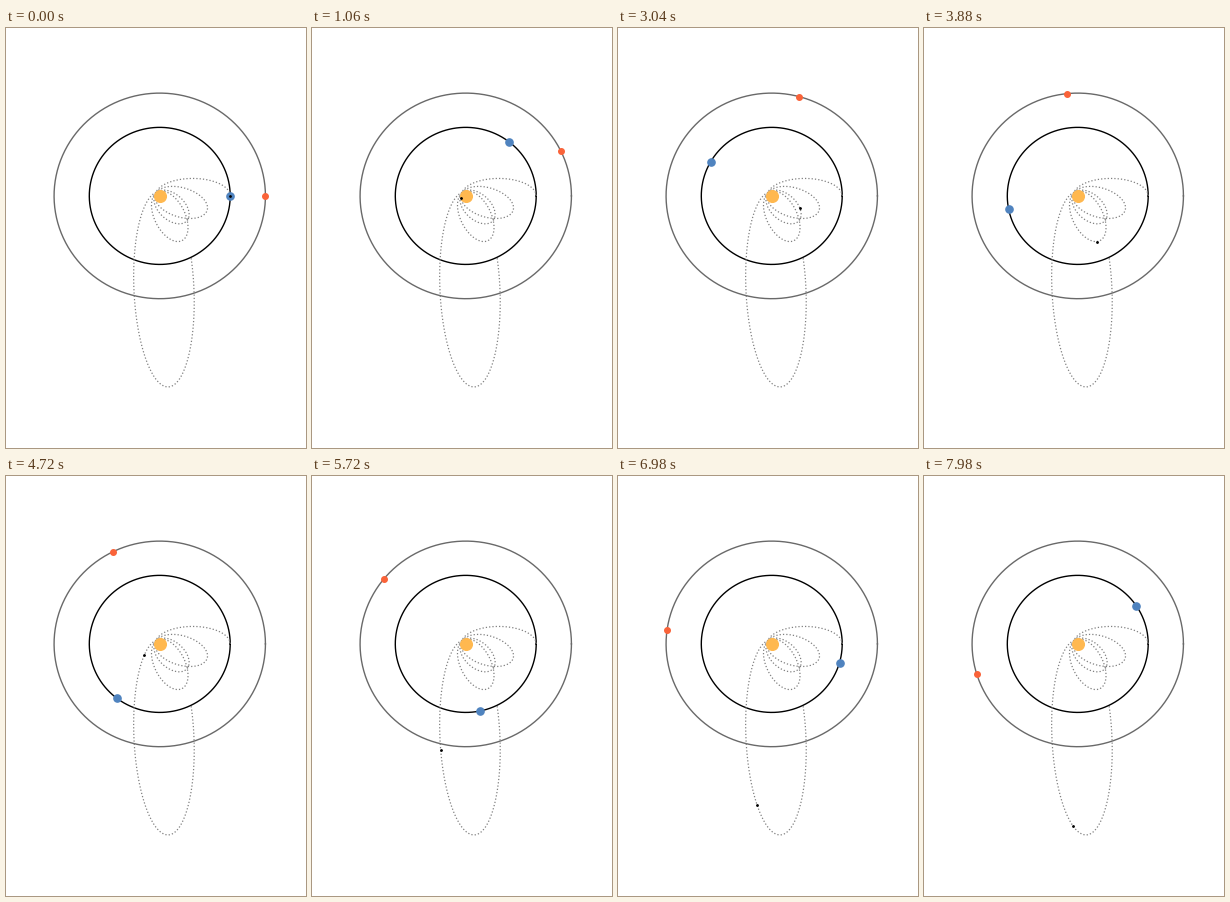
A matplotlib script for the animation above (8000 ms loop, 300 by 420 pixels).

```python
import numpy as np
import matplotlib.pyplot as plt
from matplotlib.animation import FuncAnimation

FRAMES, INTERVAL = 400, 20
YEAR = 365            # one frame is one day
PERIHELION = 0.065

# aphelion distance (AU), aphelion direction (deg), perihelion day, period (days)
LEGS = [
    (1.000, 0.0, -52.6, 105.2),
    (0.705, -17.4, 52.6, 64.7),
    (0.530, -44.0, 117.3, 46.4),
    (0.725, -64.5, 163.7, 68.37),
    (2.790, -87.5, 232.07, 454.3),
]
END_RADIUS = 1.0


def shape(leg):
    """Semi-major axis and eccentricity of a leg."""
    far = leg[0]
    return (far + PERIHELION) / 2, (far - PERIHELION) / (far + PERIHELION)


def locate(leg, ecc_anom):
    """Position in AU on a leg at the given eccentric anomaly."""
    a, e = shape(leg)
    along = a * (e - np.cos(ecc_anom))
    across = -a * np.sqrt(1 - e * e) * np.sin(ecc_anom)
    w = np.radians(leg[1])
    return (along * np.cos(w) - across * np.sin(w),
            along * np.sin(w) + across * np.cos(w))


def solve_kepler(mean, e):
    lo, hi = 0.0, 2 * np.pi
    for _ in range(40):
        mid = (lo + hi) / 2
        if mid - e * np.sin(mid) < mean:
            lo = mid
        else:
            hi = mid
    return (lo + hi) / 2


def probe_at(day):
    leg = [item for item in LEGS if item[2] <= day][-1]
    mean = 2 * np.pi * (day - leg[2]) / leg[3]
    return locate(leg, solve_kepler(mean, shape(leg)[1]))


def flight_path():
    xs, ys = [], []
    for i, leg in enumerate(LEGS):
        start = np.pi if i == 0 else 0.0
        stop = 2 * np.pi
        if i == len(LEGS) - 1:
            a, e = shape(leg)
            stop -= np.arccos((1 - END_RADIUS / a) / e)
        x, y = locate(leg, np.linspace(start, stop, 200))
        xs.append(x)
        ys.append(y)
    return np.concatenate(xs), np.concatenate(ys)


def planet_at(day, radius, period):
    angle = 2 * np.pi * day / period
    return radius * np.cos(angle), radius * np.sin(angle)


fig, ax = plt.subplots(figsize=(3, 4.2), dpi=100, facecolor="white")
fig.subplots_adjust(left=0.125, right=0.9, bottom=0.11, top=0.88)
ax.set_xlim(-1.65, 1.65)
ax.set_ylim(-3.0045, 1.7145)
ax.axis("off")

turn = np.linspace(0, YEAR, YEAR + 1)
ax.plot(*planet_at(turn, 1.0, YEAR), color="black", lw=1)
ax.plot(*planet_at(turn, 1.5, YEAR), color="dimgray", lw=1)
ax.plot(*flight_path(), ":", color="gray", lw=0.9)


def dot(color, size, x=0, y=0):
    return ax.plot([x], [y], "o", color=color, ms=size, zorder=3)[0]


sun = dot("#ffb84f", 8.4)
earth = dot("#4f83bf", 5.2, 1.0)
mars = dot("#fa6339", 4, 1.5)
probe = dot("black", 1, 1.0)


def update(day):
    for marker, (x, y) in ((earth, planet_at(day, 1.0, YEAR)),
                           (mars, planet_at(day, 1.5, 2 * YEAR)),
                           (probe, probe_at(day))):
        marker.set_data([x], [y])
    return earth, mars, probe


anim = FuncAnimation(fig, update, frames=FRAMES, interval=INTERVAL,
                     init_func=lambda: update(0), repeat=True, repeat_delay=0)
plt.show()
```
